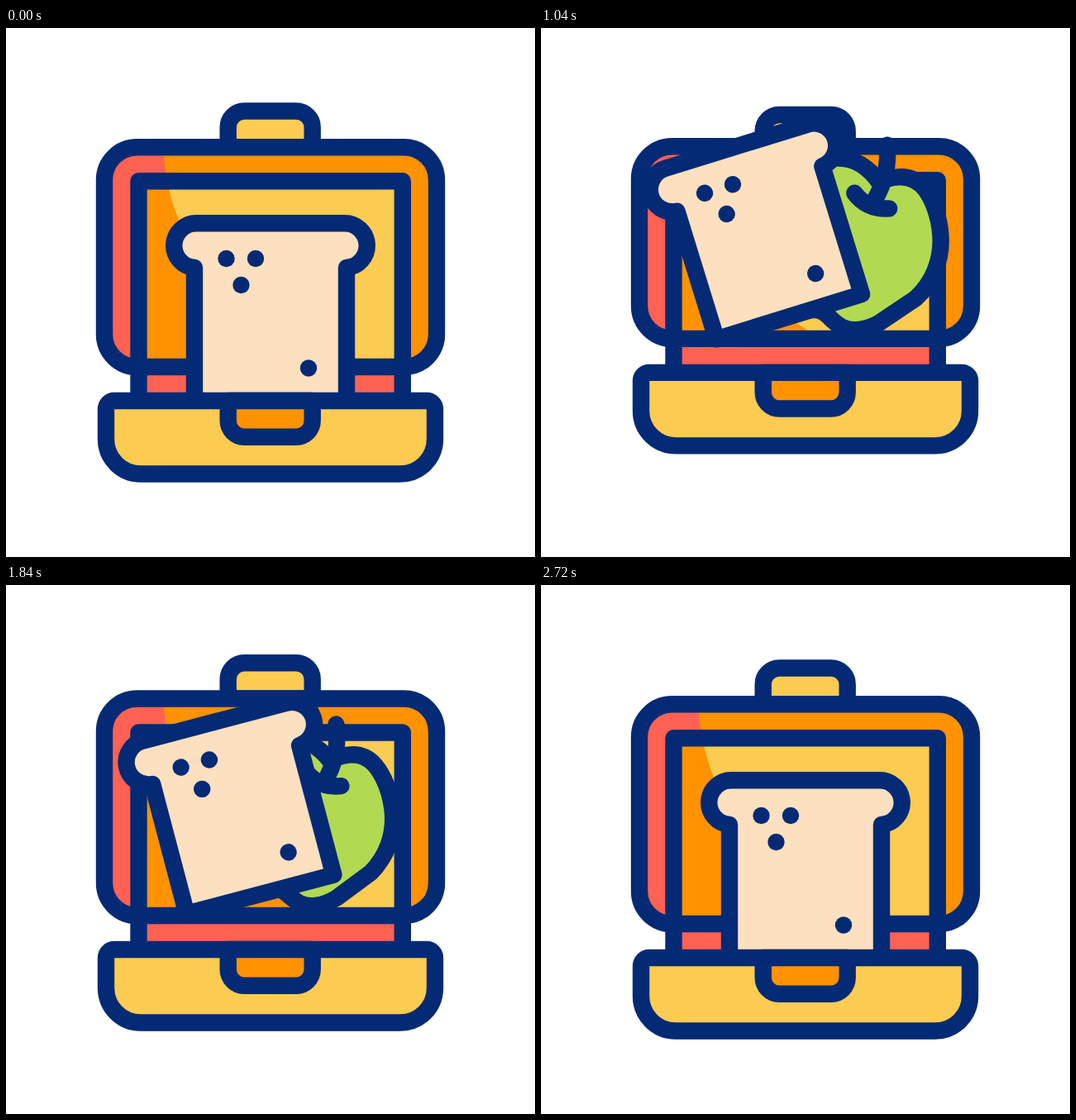
Recreate the animation shown at these times as an HTML page. Size 640 by 640 pixels, loop 3000 ms.

```html
<!DOCTYPE html>
<html lang="en">
<head>
<meta charset="utf-8">
<title>Lunch box</title>
<style>
  html, body { margin: 0; width: 100%; height: 100%; overflow: hidden; background: #fff; }
  svg { display: block; width: 100vw; height: 100vh; }
  .line { stroke: #042a75; stroke-width: 20.4; stroke-linejoin: round; stroke-linecap: round; }
</style>
</head>
<body>
<svg viewBox="0 0 640 640">
  <defs>
    <clipPath id="lidClip"><path id="lidShape"/></clipPath>
    <clipPath id="frameClip"><path id="frameShape"/></clipPath>
  </defs>

  <path id="handle" class="line" fill="#fccb51"/>

  <g clip-path="url(#lidClip)">
    <rect x="109" width="422" height="640" fill="#ff6152"/>
    <circle class="shine" cx="464" r="274.2" fill="#ff9200"/>
  </g>
  <path id="strip" fill="#ff6152"/>
  <g clip-path="url(#frameClip)">
    <rect x="150" width="340" height="640" fill="#ff9200"/>
    <circle class="shine" cx="464" r="274.2" fill="#fccb51"/>
  </g>
  <path id="lid" class="line" fill="none"/>
  <path id="frame" class="line" fill="none"/>

  <g id="apple" class="line" fill="none">
    <path fill="#b1da52" d="M460 116C448 96 430 82 408 82C362 82 322 115 322 172C322 205 325 240 341 259
      C350 270 357 270 366 269.5C388 270 388 299 421 298.5C431 298 440 295 447 292L495 264.5
      C517 247 532 220 532 187C532 165 526 143 517 129C508 115 496 111 484 111C474 111 466 113 460 116Z"/>
    <path d="M473 70Q474 106 453 137M428 127Q442 149 470 149.5"/>
  </g>

  <g id="bread">
    <path class="line" fill="#fce0bf" d="M228 452V290A26.9 26.9 0 0 1 231 236.3H409A26.9 26.9 0 0 1 412 290V452Z"/>
    <g fill="#042a75">
      <circle cx="266.5" cy="279" r="10.2"/>
      <circle cx="302" cy="279" r="10.2"/>
      <circle cx="284.5" cy="311" r="10.2"/>
      <circle cx="366" cy="411.5" r="10.2"/>
    </g>
  </g>

  <g id="base" class="line">
    <path fill="#fccb51" d="M131 451H509a10 10 0 0 1 10 10V497.5a42 42 0 0 1 -42 42H163a42 42 0 0 1 -42 -42V461a10 10 0 0 1 10 -10Z"/>
    <path fill="#ff9200" d="M268.7 451V475a19.7 19.7 0 0 0 19.7 19.7H351a19.7 19.7 0 0 0 19.7 -19.7V451Z"/>
  </g>
</svg>
<script>
const LOOP = 3000, STEP = 20, LINE = 20.4;
const $ = id => document.getElementById(id);
const shines = document.querySelectorAll('.shine');

// S-curve; a and b set how gently it starts and ends.
function ease(s, a = 2.4, b = a) {
  const up = s ** a;
  return up / (up + (1 - s) ** b);
}

// Eased moves from pose to pose: [time, value, a, b].
function moves(first, ...rest) {
  return t => {
    let [from, value] = first;
    for (const [to, next, a, b] of rest) {
      const s = Math.min(Math.max((t - from) / (to - from), 0), 1);
      if (s < 1) return value + (next - value) * ease(s, a, b);
      from = to;
      value = next;
    }
    return value;
  };
}

// Each part crouches, springs up, falls, lands, rebounds and settles.
const baseY = moves([200, 0], [500, 37.5], [1230, -40], [1685, -40], [2005, 25], [2260, -20], [2720, 0]);
const lidY = moves([200, 0], [500, 64], [690, 64], [1300, -33], [1685, -38], [2030, 44], [2270, -20], [2720, 0]);
const dipY = moves([200, 0], [500, 61], [600, 61], [1350, 0], [1685, 0], [2005, 56], [2290, -20], [2720, 0]);

// How far the food has popped out: 0 packed, 1 at the top.
const pop = moves([500, 0], [1500, 1, 1.25, 2], [2000, 0, 4.5, 1.2]);

const setPath = (id, d) => $(id).setAttribute('d', d);
const move = (id, v) => $(id).setAttribute('transform', v);

function drawBox(base, lift) {
  const top = 144.3 + lift, bottom = 410 + base;
  const inner = top + 41, floor = 451 + base;
  const knob = 100.5 + lift + 0.17 * (lift - base);
  const r = 39.5, k = 19.7;
  const arc = (n, x, y) => `a${n} ${n} 0 0 1 ${x * n} ${y * n}`;

  const lid = `M${119 + r} ${top}H${521 - r}${arc(r, 1, 1)}V${bottom - r}${arc(r, -1, 1)}`
    + `H${119 + r}${arc(r, -1, -1)}V${top + r}${arc(r, 1, -1)}Z`;
  const frame = (y0, y1) => `M160.5 ${y0}V${y1}H479.8V${y0}`;
  setPath('lid', lid);
  setPath('lidShape', lid);
  setPath('frame', frame(floor, inner));
  setPath('frameShape', frame(bottom, inner));
  setPath('strip', frame(floor, bottom));
  setPath('handle', `M268.7 ${top}V${knob + k}${arc(k, 1, -1)}H351${arc(k, 1, 1)}V${top}Z`);
  shines.forEach(c => c.setAttribute('cy', top - 12.5));
  move('base', `translate(0 ${base})`);
}

function drawFood(out, dip) {
  const slide = out ** 1.7, grow = Math.sin(out * Math.PI / 2);
  const size = 0.7 + 0.3 * grow;
  move('bread', `translate(${-98 * slide} ${dip - 169.5 * out}) rotate(${-25 * out} 320 344)`);
  move('apple', `translate(${328 + 109 * slide} ${370 + dip - 187 * out})
    rotate(${34 * (grow - 1)}) scale(${size}) translate(-430 -190)`);
  $('apple').style.strokeWidth = LINE / size;
}

function tick() {
  const now = performance.now() % LOOP;
  const t = Math.floor(now / STEP) * STEP;
  drawBox(baseY(t), lidY(t));
  drawFood(pop(t), dipY(t));
  requestAnimationFrame(tick);
}
tick();
</script>
</body>
</html>
```
